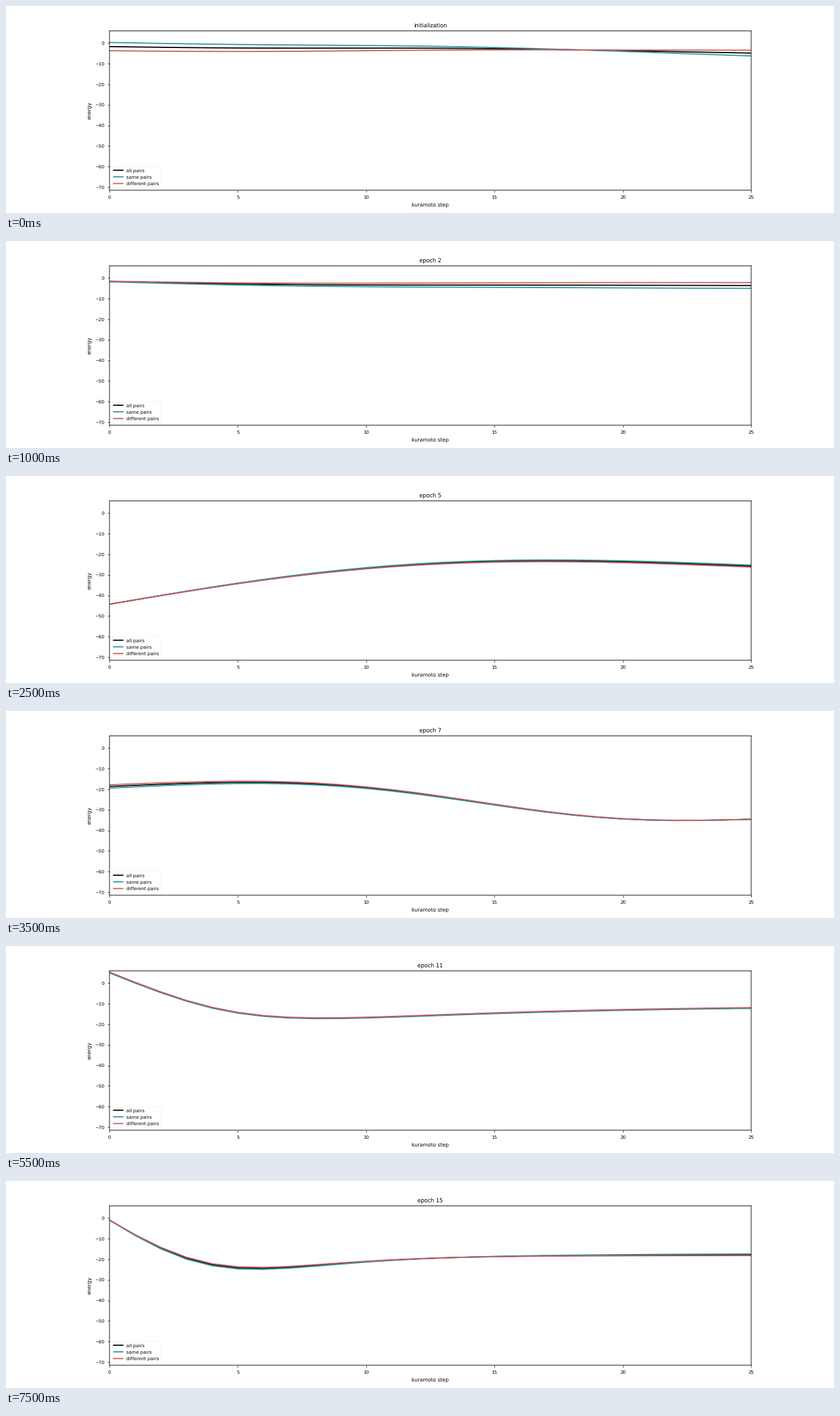
Write a matplotlib script that moves like this. It is 1280x320 px and loops after 8 s.

```python
import numpy as np
import matplotlib.pyplot as plt
from matplotlib.animation import FuncAnimation

plt.rcParams.update({
    "font.family": "DejaVu Sans",
    "text.hinting": "no_hinting",
    "path.snap": False,
    "axes.titlesize": 9.6,
    "axes.labelsize": 8.8,
    "axes.linewidth": 1,
    "xtick.labelsize": 8,
    "ytick.labelsize": 8,
    "xtick.major.pad": 5.6,
    "ytick.major.pad": 5.6,
    "legend.fontsize": 8,
    "patch.linewidth": 0.24,
})

EPOCHS = 16
LAST_STEP = 25
STEPS = np.arange(LAST_STEP + 1)

# Key epochs: start, end and the sine waves that bend the line between them
ENERGY = {
    0: (-1.75, -4.9, 0.65, -0.3, -0.15),
    1: (-2.2, -6.4, 0.5, 0, 0),
    2: (-1.7, -3.65, -0.82, -0.28, -0.06),
    3: (-12, -36.7, 0, 0, 0),
    4: (-33, -33, -9, 0, 0),
    5: (-44.3, -25.8, 10.4, 0.3, 0),
    7: (-18.7, -34.6, 3, 4.3, -0.7),
    8: (-7, -67.8, 0, 3, 0),
    9: (3.4, -7.55, -3.6, 0, 0.1),
    11: (5.1, -12.15, -11.2, 1.2, 0.4),
    15: (-1, -17.85, -13.9, -1.8, 1.1),
}

# Half the distance from different pairs up to same pairs
GAP = {
    0: (2, -1.4, 0.65),
    2: (-0.15, -1.4, -0.2),
    5: (0, 0.5, 0.1),
    7: (-0.8, 0, 0.1),
    9: (-0.15, -0.25, 0),
    11: (-0.2, -0.2, 0),
    15: (0, 0.4, -0.7),
}


def between(keys, epoch):
    return [np.interp(epoch, list(keys), column) for column in zip(*keys.values())]


def curve(keys, epoch):
    start, end, *waves = between(keys, epoch)
    # Later epochs settle early in the run, the others move evenly
    rate = 0.12 if epoch > 8 else 1e-6
    u = np.expm1(-rate * STEPS) / np.expm1(-rate * LAST_STEP)
    bend = sum(w * np.sin(n * np.pi * u) for n, w in enumerate(waves, 1))
    return start + (end - start) * u + bend


fig, ax = plt.subplots(figsize=(20, 5), dpi=64)
ax.set_xlim(0, LAST_STEP)
ax.set_ylim(-71.5, 5.9)
ax.set_xticks(range(0, 26, 5))
ax.set_yticks(range(-70, 1, 10))
ax.set_xlabel("kuramoto step")
ax.set_ylabel("energy")
title = ax.set_title("initialization")

lines = [
    ax.plot([], [], color=color, lw=2, label=label)[0]
    for color, label in [
        ("black", "all pairs"),
        ("#2f999e", "same pairs"),
        ("#cd5c5c", "different pairs"),
    ]
]
ax.legend(loc="lower left")


def update(epoch):
    mean, gap = curve(ENERGY, epoch), curve(GAP, epoch)
    for line, y in zip(lines, (mean, mean + gap, mean - gap)):
        line.set_data(STEPS, y)
    title.set_text(f"epoch {epoch}" if epoch else "initialization")
    return [*lines, title]


anim = FuncAnimation(fig, update, frames=EPOCHS, interval=500,
                     repeat=True, repeat_delay=0, blit=False)
plt.show()
```
